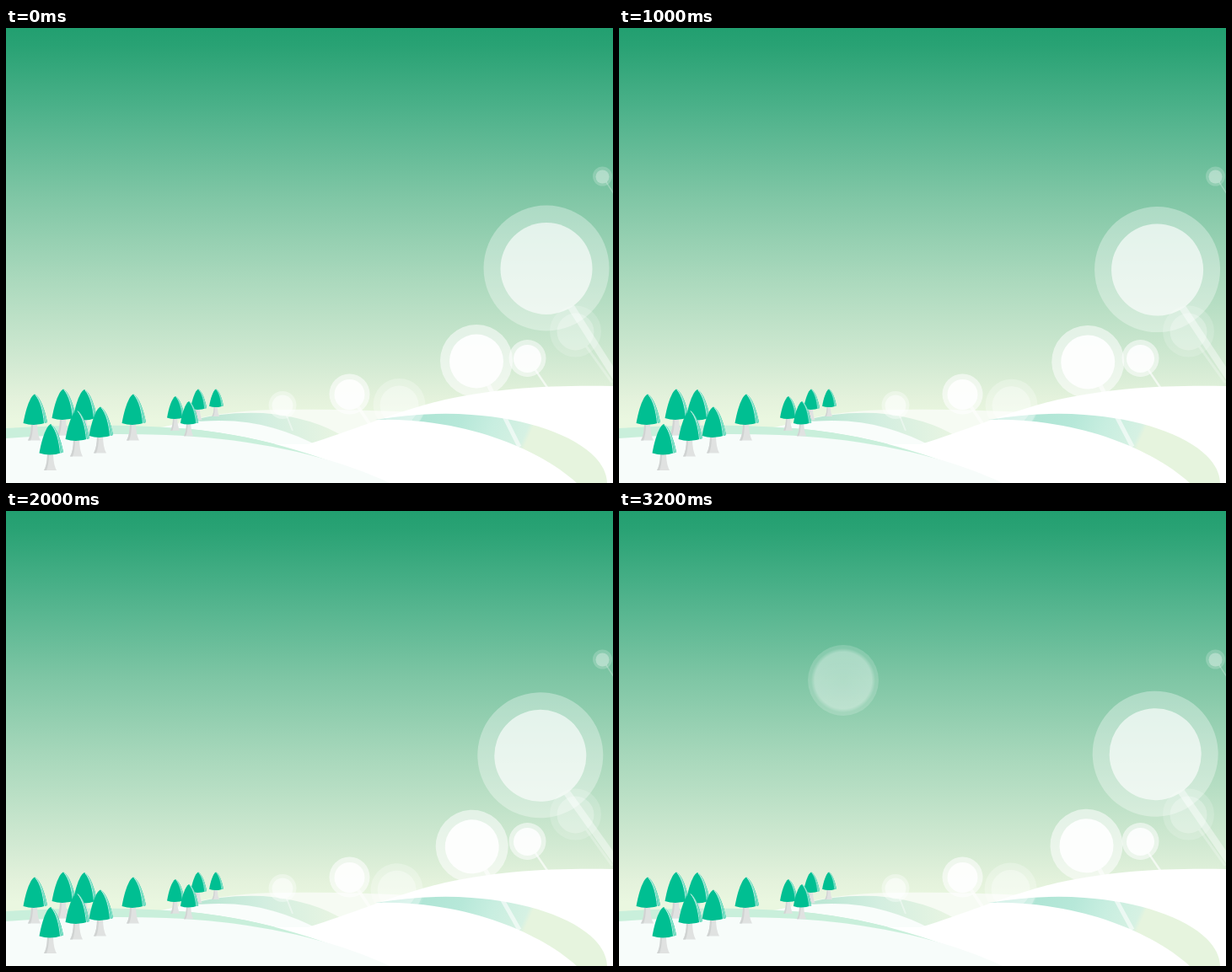
Write an HTML page that moves like this. It is 720x540 px and loops after 3400 ms.

```html
<!DOCTYPE html>
<html lang="en">
<head>
<meta charset="utf-8">
<title>Snowy hills</title>
<style>
  html, body { margin: 0; width: 100%; height: 100%; overflow: hidden; background: #eaf7e0; }
  svg { display: block; width: 720px; height: 540px; }
</style>
</head>
<body>
<svg viewBox="0 0 720 540" xmlns="http://www.w3.org/2000/svg">
  <defs>
    <linearGradient id="sky" x1="0" y1="0" x2="0" y2="1">
      <stop offset="0" stop-color="#229f70"/>
      <stop offset=".04" stop-color="#29a274"/>
      <stop offset=".185" stop-color="#4eb28b"/>
      <stop offset=".37" stop-color="#7fc6a5"/>
      <stop offset=".555" stop-color="#abd9bd"/>
      <stop offset=".74" stop-color="#d3ead3"/>
      <stop offset=".815" stop-color="#e4f2dc"/>
      <stop offset=".86" stop-color="#eaf7e0"/>
      <stop offset="1" stop-color="#eaf7e0"/>
    </linearGradient>
    <linearGradient id="farBand" gradientUnits="userSpaceOnUse" x1="230" y1="0" x2="400" y2="0">
      <stop offset="0" stop-color="#b9e6d3"/>
      <stop offset=".45" stop-color="#d3eee0"/>
      <stop offset="1" stop-color="#e9f5e2"/>
    </linearGradient>
    <linearGradient id="nearBand" gradientUnits="userSpaceOnUse" x1="440" y1="440" x2="620" y2="520">
      <stop offset="0" stop-color="#a6e2d0"/>
      <stop offset=".28" stop-color="#bfeadd"/>
      <stop offset=".3" stop-color="#afe5d5"/>
      <stop offset=".52" stop-color="#b7e8d9"/>
      <stop offset=".7" stop-color="#c8eee0"/>
      <stop offset=".9" stop-color="#d6f1e3"/>
      <stop offset=".93" stop-color="#e6f4de"/>
      <stop offset="1" stop-color="#e6f4de"/>
    </linearGradient>
    <radialGradient id="soft">
      <stop offset="0" stop-color="#fff" stop-opacity=".86"/>
      <stop offset=".88" stop-color="#fff"/>
      <stop offset="1" stop-color="#fff" stop-opacity="0"/>
    </radialGradient>
    <g id="tree">
      <path d="M-4 34 Q-4 48-8 55 H7 Q3 48 3 34Z" fill="#e0e2e1"/>
      <path d="M-4 34 Q-4 48-8 55 H-5 Q-2 48-2 34Z" fill="#d0d3d2"/>
      <path d="M0 0 C-6 3-11 20-13.5 34.5 Q0 39 15 33.5 C12 18 7 4 0 0Z" fill="#00bf92"/>
      <path d="M0 0 C7 4 12 18 15 33.5 L12.5 34.6 C11 19 6 6 0 0Z" fill="#7fdfc6"/>
      <path d="M1 1 C7 8 10 20 11.5 34.5" fill="none" stroke="#e9faf5" stroke-width=".8"/>
    </g>
  </defs>

  <rect width="720" height="540" fill="url(#sky)"/>

  <path d="M170 480 Q240 453 330 453 Q420 452 520 458 V540 H170Z" fill="#f6fbf3"/>
  <path d="M222 465 Q262 455 305 457 Q365 462 402 486 L360 494Z" fill="url(#farBand)"/>
  <path d="M160 480 Q250 455 318 475 Q346 483 372 497 L360 540 H160Z" fill="#f9fdfb"/>

  <path d="M0 475 Q115 468 205 475 C290 481 370 505 450 540 H0Z" fill="#c9efdb"/>
  <path d="M300 540 V494 H358 C410 478 450 460 505 445 C580 426 650 424 720 425 V540Z" fill="#fff"/>
  <path d="M205 475 C290 481 370 505 450 540 L420 530 Q340 496 205 483Z" fill="#c9efdb"/>
  <path d="M0 487 Q95 480 190 483 C290 487 385 507 455 540 H0Z" fill="#f7fcfa"/>
  <path d="M438 465 Q500 455 552 459 C640 465 712 498 713 540 H677 C640 506 555 462 438 465Z" fill="url(#nearBand)"/>

  <g id="trees"></g>
  <g id="lamps" fill="#fff" stroke="none"></g>
  <g id="bubble" fill="#fff">
    <circle id="halo" opacity=".17"/>
    <circle id="core" fill="url(#soft)"/>
  </g>
</svg>
<script>
  const NS = "http://www.w3.org/2000/svg";
  const STEP = 200, LOOP = 3400;
  const $ = id => document.getElementById(id);

  function add(parent, tag, attrs) {
    const el = document.createElementNS(NS, tag);
    for (const key in attrs) el.setAttribute(key, attrs[key]);
    return parent.appendChild(el);
  }

  // tip x, tip y, scale
  const trees = [
    [68, 428.5, 1], [93, 429, 1], [34, 434.5, 1], [112, 449.5, 1], [84, 453.5, 1],
    [53, 470, 1], [151, 434.5, 1], [228, 428.5, .67], [201, 437, .74],
    [217, 443, .75], [249, 428.5, .59]
  ];
  for (const [x, y, s] of trees)
    add($("trees"), "use", { href: "#tree", transform: `translate(${x} ${y}) scale(${s})` });

  // A ring, a disc and a stem running from the disc towards its foot.
  function lamp({ x, y, ring, disc, ringA, discA, foot, stem, stemA }) {
    const g = add($("lamps"), "g", {});
    const [fx, fy] = foot;
    const k = disc / Math.hypot(fx - x, fy - y);
    add(g, "line", {
      x1: x + (fx - x) * k, y1: y + (fy - y) * k, x2: fx, y2: fy,
      stroke: "#fff", "stroke-width": stem, "stroke-opacity": stemA
    });
    add(g, "circle", { cx: x, cy: y, r: ring, opacity: ringA });
    add(g, "circle", { cx: x, cy: y + .5, r: disc, opacity: discA });
    return { g, foot };
  }

  lamp({ x: 707.5, y: 176, ring: 11.5, disc: 8, ringA: .2, discA: .32, foot: [721, 197], stem: 1.5, stemA: .25 });
  lamp({ x: 675.5, y: 360, ring: 30.5, disc: 22, ringA: .17, discA: .25, foot: [719, 421], stem: 3, stemA: .25 });
  lamp({ x: 328, y: 447.5, ring: 16.5, disc: 12.5, ringA: .35, discA: .5, foot: [340, 478], stem: 2, stemA: .4 });
  lamp({ x: 407.5, y: 434.5, ring: 24, disc: 18, ringA: .58, discA: .85, foot: [434, 474], stem: 4, stemA: .5 });
  lamp({ x: 618.5, y: 392, ring: 22, disc: 16.5, ringA: .55, discA: .85, foot: [643, 428], stem: 2.5, stemA: .65 });

  const swaying = [
    lamp({ x: 466.5, y: 447, ring: 31, disc: 23, ringA: .25, discA: .32, foot: [506, 504], stem: 4, stemA: .4 }),
    lamp({ x: 558, y: 395, ring: 43, disc: 32, ringA: .55, discA: .9, foot: [609, 497], stem: 5, stemA: .6 }),
    lamp({ x: 641, y: 285, ring: 74.5, disc: 54.5, ringA: .33, discA: .64, foot: [730, 425], stem: 8.5, stemA: .42 })
  ];

  // Sway angle in degrees for each step.
  const sway = [0, -1, -2, -3, -2.6, -1, 0, .8, -1, -2, -3, -2.6, -1.6, -.4, .8, -1, -2];

  // x, y, radius, core opacity, from step 13 on
  const puffs = [[239.5, 187, 21, .72], [248, 192, 32, .56], [257, 197, 37, .42], [266, 201, 42, .3]];
  const FIRST_PUFF = 13;

  function draw(now) {
    const step = Math.floor((now % LOOP) / STEP);
    for (const { g, foot } of swaying)
      g.setAttribute("transform", `rotate(${sway[step]} ${foot[0]} ${foot[1]})`);

    const puff = puffs[step - FIRST_PUFF];
    $("bubble").setAttribute("visibility", puff ? "visible" : "hidden");
    if (puff) {
      const [x, y, r, alpha] = puff;
      $("bubble").setAttribute("transform", `translate(${x} ${y})`);
      $("halo").setAttribute("r", r);
      $("core").setAttribute("r", r * .91);
      $("core").setAttribute("opacity", alpha);
    }
  }

  const start = performance.now();
  function tick() {
    draw(performance.now() - start);
    requestAnimationFrame(tick);
  }
  tick();
</script>
</body>
</html>
```
